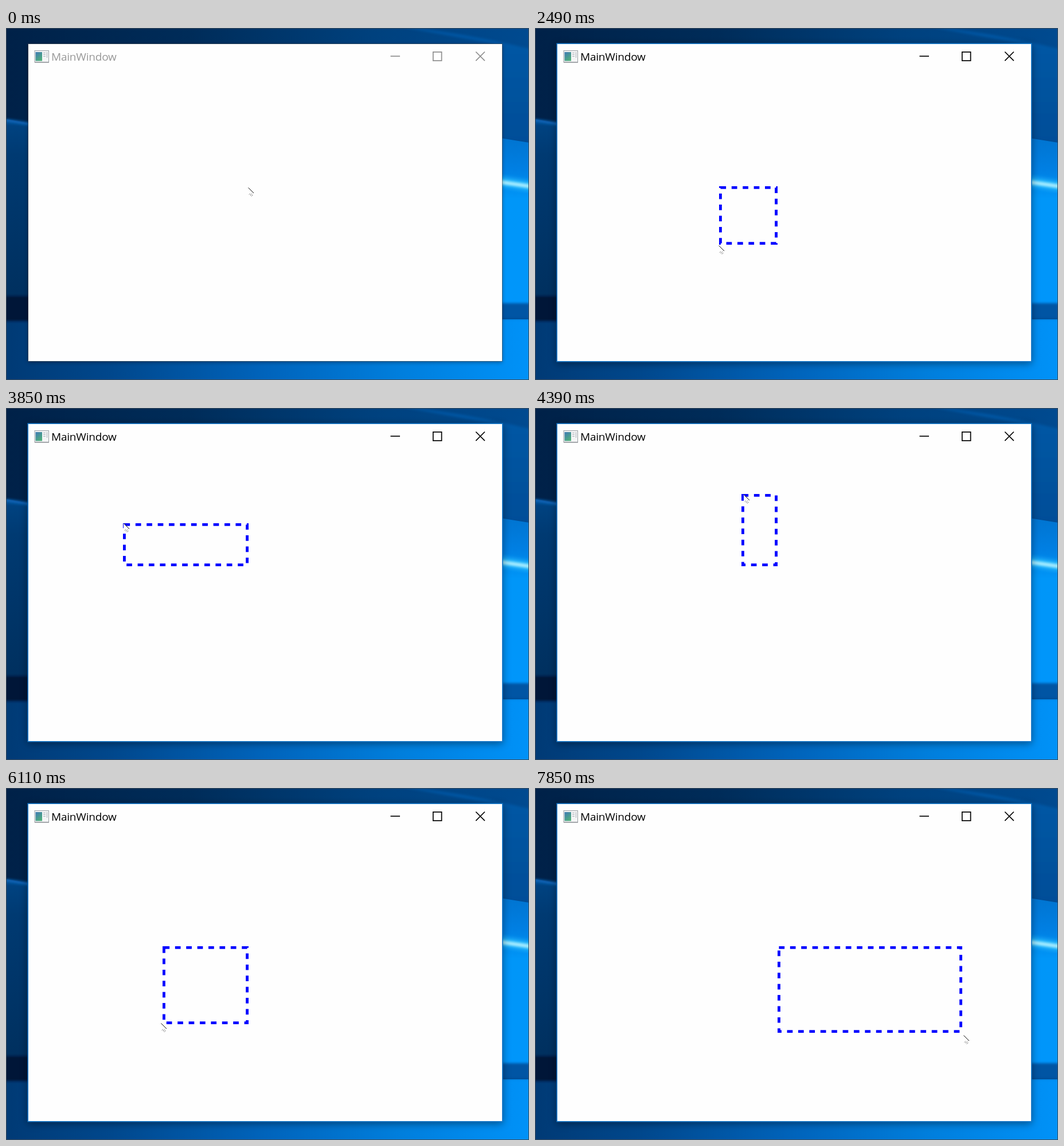
These frames come from a looping animation (912x614 px, 8000 ms). An HTML page:

```html
<!DOCTYPE html>
<html lang="en">
<head>
<meta charset="utf-8">
<title>Rubber band selection</title>
<style>
  html, body { margin: 0; width: 100%; height: 100%; overflow: hidden; background: #003c78; }
  svg { position: absolute; left: 0; top: 0; display: block; }
  #frame {
    position: absolute; left: 39px; top: 27.5px; width: 826px; height: 553.5px;
    background: #fefefe;
    box-shadow: 0 0 0 1px rgba(70, 80, 90, .6), 0 2px 7px rgba(0, 0, 0, .4);
  }
  .active #frame { box-shadow: 0 0 0 1.6px #1678c8, 0 3px 13px 1px rgba(0, 0, 0, .45); }
  #title { font: 19px "Open Sans", "Noto Sans", sans-serif; letter-spacing: -.22px; fill: #989898; }
  #buttons { fill: none; stroke: #8e8e8e; stroke-width: 1.7; }
  .active #title { fill: #000; }
  .active #buttons { stroke: #000; }
</style>
</head>
<body>
<svg width="912" height="614" viewBox="0 0 912 614">
  <defs>
    <linearGradient id="sky">
      <stop offset="0" stop-color="#002148"/>
      <stop offset=".35" stop-color="#002c59"/>
      <stop offset=".7" stop-color="#00417e"/>
      <stop offset="1" stop-color="#004a90"/>
    </linearGradient>
    <linearGradient id="floor">
      <stop offset="0" stop-color="#003a75"/>
      <stop offset=".2" stop-color="#00478c"/>
      <stop offset=".5" stop-color="#0064bc"/>
      <stop offset=".75" stop-color="#007edc"/>
      <stop offset="1" stop-color="#0092f8"/>
    </linearGradient>
    <linearGradient id="left" x2="0" y2="1">
      <stop offset="0" stop-color="#00509a"/>
      <stop offset=".04" stop-color="#004280"/>
      <stop offset=".2" stop-color="#003a72"/>
      <stop offset="1" stop-color="#00305f"/>
    </linearGradient>
    <linearGradient id="right" x2="0" y2="1">
      <stop offset="0" stop-color="#0074d0"/>
      <stop offset=".2" stop-color="#0080e4"/>
      <stop offset=".36" stop-color="#0096f8"/>
      <stop offset="1" stop-color="#0096fb"/>
    </linearGradient>
    <linearGradient id="beam" x2="0" y2="1">
      <stop offset="0" stop-color="#0058a6"/>
      <stop offset="1" stop-color="#004e98"/>
    </linearGradient>
    <linearGradient id="picture" x2=".6" y2="1">
      <stop offset="0" stop-color="#3f79b5"/>
      <stop offset="1" stop-color="#4fae7c"/>
    </linearGradient>
    <filter id="soft" x="-50%" y="-50%" width="200%" height="200%"><feGaussianBlur stdDeviation="2"/></filter>
    <filter id="glow" x="-50%" y="-100%" width="200%" height="300%"><feGaussianBlur stdDeviation="4"/></filter>
  </defs>
  <rect width="912" height="614" fill="url(#sky)"/>
  <path d="M690 -2 Q800 8 920 38 V203 L850 190 V27 Z" fill="url(#beam)" filter="url(#soft)"/>
  <path d="M0 159 L60 170 V470 H0 Z" fill="url(#left)"/>
  <path d="M0 161 L60 170" stroke="#0c64b5" stroke-width="5" filter="url(#soft)"/>
  <path d="M850 190 L912 200 V490 H850 Z" fill="url(#right)"/>
  <path d="M850 266 L920 277" stroke="#29c0ff" stroke-width="14" filter="url(#glow)"/>
  <path d="M850 267 L920 277" stroke="#b0efff" stroke-width="6" filter="url(#soft)"/>
  <rect y="508" width="912" height="106" fill="url(#floor)"/>
  <rect x="-9" y="468" width="69" height="43" fill="#001937" filter="url(#soft)"/>
  <rect x="850" y="480" width="70" height="27" fill="#0055a4" filter="url(#soft)"/>
  <rect x=".5" y=".5" width="911" height="613" fill="none" stroke="#3d4b59"/>
</svg>
<div id="frame"></div>
<svg width="912" height="614" viewBox="0 0 912 614">
  <g>
    <rect x="50" y="39.5" width="24.5" height="20" fill="#f4f5f6" stroke="#9a9fa4"/>
    <rect x="51.5" y="42" width="11.5" height="15.5" fill="url(#picture)"/>
    <path d="M65 43.5h4M65 46.5h4M65 49.5h4M71.5 42v10" stroke="#a9b0b7" fill="none"/>
    <path d="M50 60h25" stroke="#7c8186"/>
  </g>
  <text id="title" x="79" y="57">MainWindow</text>
  <g id="buttons">
    <path d="M670.5 49.2h16.5"/>
    <rect x="744.8" y="41.9" width="14.8" height="15.1"/>
    <path d="M819.3 41.5l15.6 15.6M834.9 41.5l-15.6 15.6"/>
  </g>
  <rect id="band" stroke="#00f"/>
  <g id="cursor">
    <path d="M0 0V14L3 11L5 15L7.5 14L6 10.5H10Z" fill="#fefefe"/>
    <path d="M.5 .5L10 10" stroke="#111"/>
    <path d="M2 12.5l2-2M4 14l3-3.5M6 15.5l2.5-3" stroke="#333" stroke-dasharray="1.2 .8"/>
  </g>
</svg>
<script>
const LOOP = 8000, ACTIVATE = 690;
const DRAG_START = 1664, TICK = 134.13;
const LINE = 4.85, DASH = 2 * LINE;
const ANCHOR = { x: 423, y: 276 };
const REST = [422, 278];

// Turning points of the drag: tick, corner x, corner y
const PATH = [
  [0, 416, 287], [4, 373, 355], [7, 294, 381], [11, 209, 350], [14, 202, 262],
  [17, 220, 177], [20, 360, 150], [24, 633, 231], [28, 627, 422], [30, 523, 491],
  [32, 336, 475], [35, 205, 266], [39, 369, 120], [42, 655, 167], [46, 745, 427]
];

const band = document.getElementById("band");
const cursor = document.getElementById("cursor");

function setAttrs(el, attrs) {
  for (const key in attrs) el.setAttribute(key, attrs[key]);
}

function slope(i, axis) {
  const a = PATH[Math.max(i - 1, 0)], b = PATH[Math.min(i + 1, PATH.length - 1)];
  return (b[axis] - a[axis]) / (b[0] - a[0]);
}

// Smooth cubic curve through the turning points
function cornerAt(tick) {
  const k = Math.max(tick, 0);
  const i = Math.min(PATH.findLastIndex(p => p[0] <= k), PATH.length - 2);
  const a = PATH[i], b = PATH[i + 1];
  const span = b[0] - a[0], u = (k - a[0]) / span, v = 1 - u;
  return [1, 2].map(axis => Math.round(
    v * v * (1 + 2 * u) * a[axis] + u * u * (1 + 2 * v) * b[axis] +
    span * u * v * (v * slope(i, axis) - u * slope(i + 1, axis))
  ));
}

// The pointer runs slightly ahead of the corner it drags.
function pointerAt(tick) {
  if (tick < 0) return REST;
  const [x, y] = cornerAt(tick), [px, py] = cornerAt(tick - 1);
  return [Math.round(x + 1 + .06 * (x - px)), Math.round(y + 1 + .04 * (y - py))];
}

function drawBand([x, y]) {
  const w = Math.abs(x - ANCHOR.x), h = Math.abs(y - ANCHOR.y);
  const solid = Math.min(w, h) <= 2 * LINE;
  const inset = solid ? 0 : LINE;
  setAttrs(band, {
    x: Math.min(x, ANCHOR.x) + inset / 2,
    y: Math.min(y, ANCHOR.y) + inset / 2,
    width: w - inset,
    height: h - inset,
    fill: solid ? "#00f" : "none",
    "stroke-width": inset,
    "stroke-dasharray": `${DASH} ${DASH}`
  });
}

function draw(time) {
  const t = time % LOOP;
  const tick = Math.floor((t - DRAG_START) / TICK);
  document.body.classList.toggle("active", t >= ACTIVATE);
  band.style.display = tick < 0 ? "none" : "";
  if (tick >= 0) drawBand(cornerAt(tick));
  cursor.setAttribute("transform", `translate(${pointerAt(tick)})`);
}

const start = performance.now();
function loop() {
  draw(performance.now() - start);
  requestAnimationFrame(loop);
}
loop();
</script>
</body>
</html>
```
